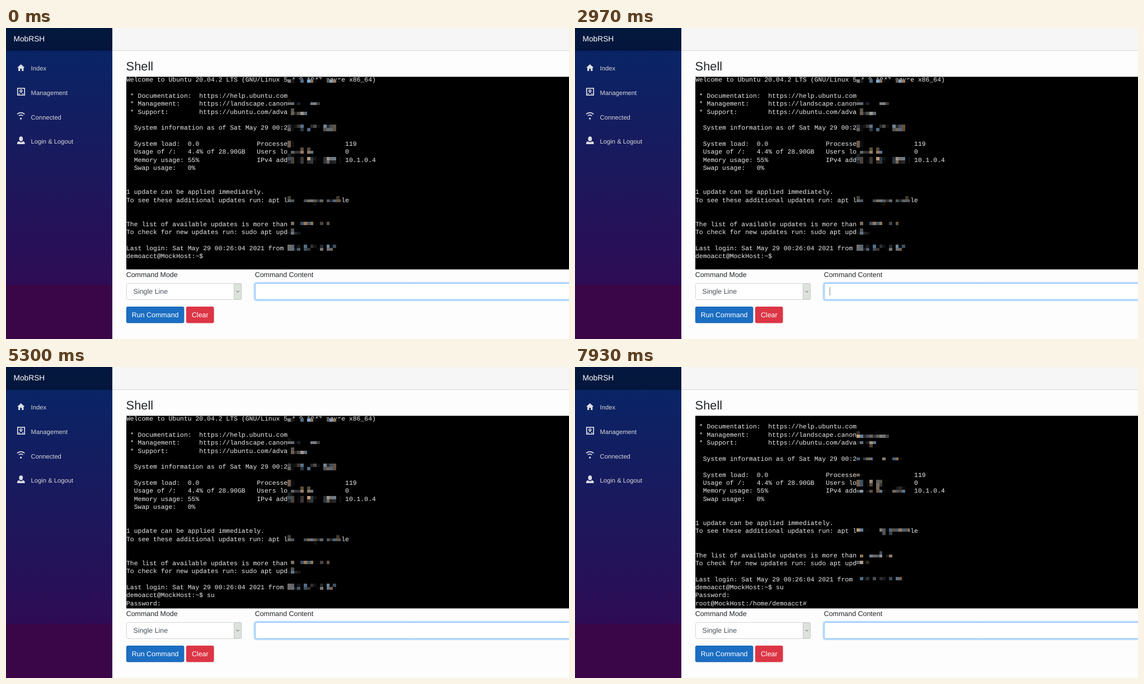
These frames come from a looping animation (1006x557 px, 8000 ms). An HTML page with a canvas:

```html
<!DOCTYPE html>
<html lang="en">
<head>
<meta charset="utf-8">
<title>Web shell</title>
<style>
html, body { margin: 0; width: 100%; height: 100%; overflow: hidden; background: #fdfdfd; }
canvas { display: block; }
</style>
</head>
<body>
<canvas id="stage" width="1006" height="557"></canvas>
<script>
const ctx = document.getElementById("stage").getContext("2d", { willReadFrequently: true });
const LOOP = 8000;
const SANS = '"Liberation Sans", Arial, sans-serif';
const MONO = '"Liberation Mono", "Courier New", monospace';

// What the input holds, and when the caret flips between hidden and shown
const TYPED = [[0, ""], [650, "s"], [800, "su"], [2970, ""], [4830, "1"], [4910, "12"], [4990, "123"], [5300, ""]];
const FLIPS = [500, 1030, 1580, 2130, 2590, 3210, 3680, 4220, 4750, 5300, 5370, 5860, 6390, 6940, 7470, 7930];
const ECHO_AT = 4060, ROOT_AT = 6540;

const TERM = { x: 215, y: 87.4, w: 791, h: 345, cell: 6.86, line: 14.386, base: 96 };
const MASK = { x: 503, y: 92, w: 95, h: 308, size: 5.8 };

const PROMPT = "demoacct@MockHost:~$";
const stats = (left, label, value) => left.padEnd(34) + label.padEnd(23) + value;
const BANNER = [
  "Welcome to Ubuntu 20.04.2 LTS (GNU/Linux 5.4.0-1047-azure x86_64)",
  "",
  " * Documentation:  https://help.ubuntu.com",
  " * Management:     https://landscape.canonical.com",
  " * Support:        https://ubuntu.com/advantage",
  "",
  "  System information as of Sat May 29 00:26:04 UTC 2021",
  "",
  stats("  System load:  0.0", "Processes:", "119"),
  stats("  Usage of /:   4.4% of 28.90GB", "Users logged in:", "0"),
  stats("  Memory usage: 55%", "IPv4 address for eth0:", "10.1.0.4"),
  "  Swap usage:   0%",
  "",
  "",
  "1 update can be applied immediately.",
  "To see these additional updates run: apt list --upgradable",
  "",
  "",
  "The list of available updates is more than a week old.",
  "To check for new updates run: sudo apt update",
  "",
  "Last login: Sat May 29 00:26:04 2021 from 203.0.113.147"
];
const SCREENS = [
  [...BANNER, PROMPT],
  [...BANNER, PROMPT + " su", "Password:"],
  [...BANNER.slice(1), PROMPT + " su", "Password:", "root@MockHost:/home/demoacct#"]
];

function rect(x, y, w, h, color) {
  ctx.fillStyle = color;
  ctx.fillRect(x, y, w, h);
}

function text(str, x, y, size, color) {
  ctx.font = size + "px " + SANS;
  ctx.fillStyle = color;
  ctx.fillText(str, x, y);
}

function box(x, y, w, h, r, fill, stroke) {
  ctx.beginPath();
  ctx.roundRect(x, y, w, h, r);
  ctx.fillStyle = fill;
  ctx.fill();
  if (stroke) {
    ctx.strokeStyle = stroke;
    ctx.lineWidth = 1;
    ctx.stroke();
  }
}

function button(label, x, w, fill, edge) {
  box(x, 498.9, w, 29.5, 3, edge);
  box(x + 0.8, 499.7, w - 1.6, 27.9, 2.4, fill);
  ctx.textAlign = "center";
  text(label, x + w / 2, 518, 12.45, "#fff");
  ctx.textAlign = "left";
}

function arc(x, y, r, from, to) {
  ctx.beginPath();
  ctx.arc(x, y, r, from * Math.PI, to * Math.PI);
  ctx.stroke();
}

function dot(x, y, r) {
  ctx.beginPath();
  ctx.arc(x, y, r, 0, 2 * Math.PI);
  ctx.fill();
}

function icons() {
  ctx.fillStyle = ctx.strokeStyle = "#dcdee4";
  ctx.fill(new Path2D("M26.7 65L20 71h2v6h3.2v-4h3v4h3.2v-6h2z"));

  ctx.lineWidth = 1.7;
  ctx.strokeRect(20.8, 108, 12.4, 12.2);
  ctx.lineWidth = 1.5;
  arc(26.8, 112.6, 1.9, 0, 2);
  ctx.fill(new Path2D("M25 114l1.8 3 1.8-3zM22.5 117h2.2v1.6h-2.2zM29 117h2.2v1.6H29z"));

  ctx.lineWidth = 1.7;
  arc(26.6, 161, 9.4, 1.25, 1.75);
  arc(26.6, 161, 5.2, 1.25, 1.75);
  dot(26.6, 162.2, 1.6);

  ctx.beginPath();
  ctx.ellipse(26.8, 198.5, 3.4, 4.2, 0, 0, 2 * Math.PI);
  ctx.fill();
  ctx.fill(new Path2D("M20 208v-1.6q0-3.2 3.4-3.4 3.4 3.2 6.8 0 3.4.2 3.4 3.4v1.6z"));
}

function sidebar() {
  const g = ctx.createLinearGradient(0, 0, 0, 557);
  const step = 460 / 557;
  g.addColorStop(0, "#052767");
  g.addColorStop(step, "#2e0c55");
  g.addColorStop(step, "#3a0647");
  g.addColorStop(1, "#3a0647");
  rect(0, 0, 190, 557, g);
  rect(0, 0, 190, 41, "rgba(0,0,0,0.4)");
  text("MobRSH", 13.5, 24.4, 13.75, "#fff");
  ["Index", "Management", "Connected", "Login & Logout"].forEach((label, i) =>
    text(label, 44.6, 76.2 + i * 43.65, 11.23, "#d7d7d7"));
  icons();
}

// Each tile takes the tone around its centre, with a warm or cool cast
function pixelate() {
  const { x, y, w, h, size } = MASK;
  const px = ctx.getImageData(x, y, w, h).data;
  for (let r = 0; r * size < h; r++) {
    for (let c = 0; c * size < w; c++) {
      const x0 = Math.round(c * size), x1 = Math.min(w, Math.round((c + 1) * size));
      const y0 = Math.round(r * size), y1 = Math.min(h, Math.round((r + 1) * size));
      const mx = (x0 + x1) >> 1, my = (y0 + y1) >> 1;
      let sum = 0;
      for (let j = my - 1; j <= my; j++)
        for (let i = mx - 1; i <= mx; i++) sum += px[(j * w + i) * 4 + 1];
      const v = Math.min(175, sum / 4);
      const cast = 0.25 * Math.sin(r * 12.99 + c * 78.23);
      rect(x + x0, y + y0, x1 - x0, y1 - y0,
        `rgb(${v * (1 + cast)},${v},${v * (1 - cast)})`);
    }
  }
}

function terminal(lines) {
  const { x, y, w, h, cell, line, base } = TERM;
  rect(x, y, w, h, "#000");
  ctx.font = "11.43px " + MONO;
  ctx.fillStyle = "#ececec";
  lines.forEach((str, row) => {
    [...str].forEach((ch, col) => {
      if (ch !== " ") ctx.fillText(ch, x + col * cell, base + row * line);
    });
  });
  pixelate();
}

function form(value, caret) {
  text("Command Mode", 214.7, 446, 12.45, "#212529");
  text("Command Content", 444.7, 446, 12.45, "#212529");

  box(215.4, 457.6, 205.2, 28.8, 3, "#fff", "#ced4da");
  box(407.5, 458, 13, 28, 1, "#dde3dc", "#c3c9c2");
  ctx.strokeStyle = "#555";
  ctx.lineWidth = 1;
  ctx.stroke(new Path2D("M411.6 470.8l2.6 2.4 2.6-2.4"));
  text("Single Line", 227.6, 476, 12.45, "#495057");

  box(442.5, 454.7, 600, 34.6, 5, "#bfdeff");
  box(445.4, 457.6, 600, 28.8, 3, "#fff", "#80bdff");
  text(value, 455, 476, 12.45, "#495057");
  if (caret) {
    const at = Math.floor(455 + ctx.measureText(value).width);
    rect(at, 464, 1, 15, "#82878c");
  }

  button("Run Command", 214.9, 103.5, "#1b6ec2", "#1861ac");
  button("Clear", 321.9, 49.7, "#dc3545", "#dc3545");
}

function draw(screen, value, caret) {
  ctx.textRendering = "geometricPrecision";
  rect(0, 0, 1006, 557, "#fdfdfd");
  rect(190, 0, 816, 40, "#f6f6f6");
  rect(190, 40, 816, 1, "#d6d5d5");
  sidebar();
  text("Shell", 214.6, 75.6, 21.8, "#212529");
  terminal(SCREENS[screen]);
  form(value, caret);
}

let shown = null;
const start = performance.now();

function tick() {
  const t = (performance.now() - start) % LOOP;
  const value = TYPED.filter(k => k[0] <= t).pop()[1];
  const caret = FLIPS.filter(f => f <= t).length % 2 === 1;
  const screen = (t >= ECHO_AT) + (t >= ROOT_AT);
  const state = [screen, value, caret].join("|");
  if (state !== shown) {
    shown = state;
    draw(screen, value, caret);
  }
  requestAnimationFrame(tick);
}
tick();
</script>
</body>
</html>
```
